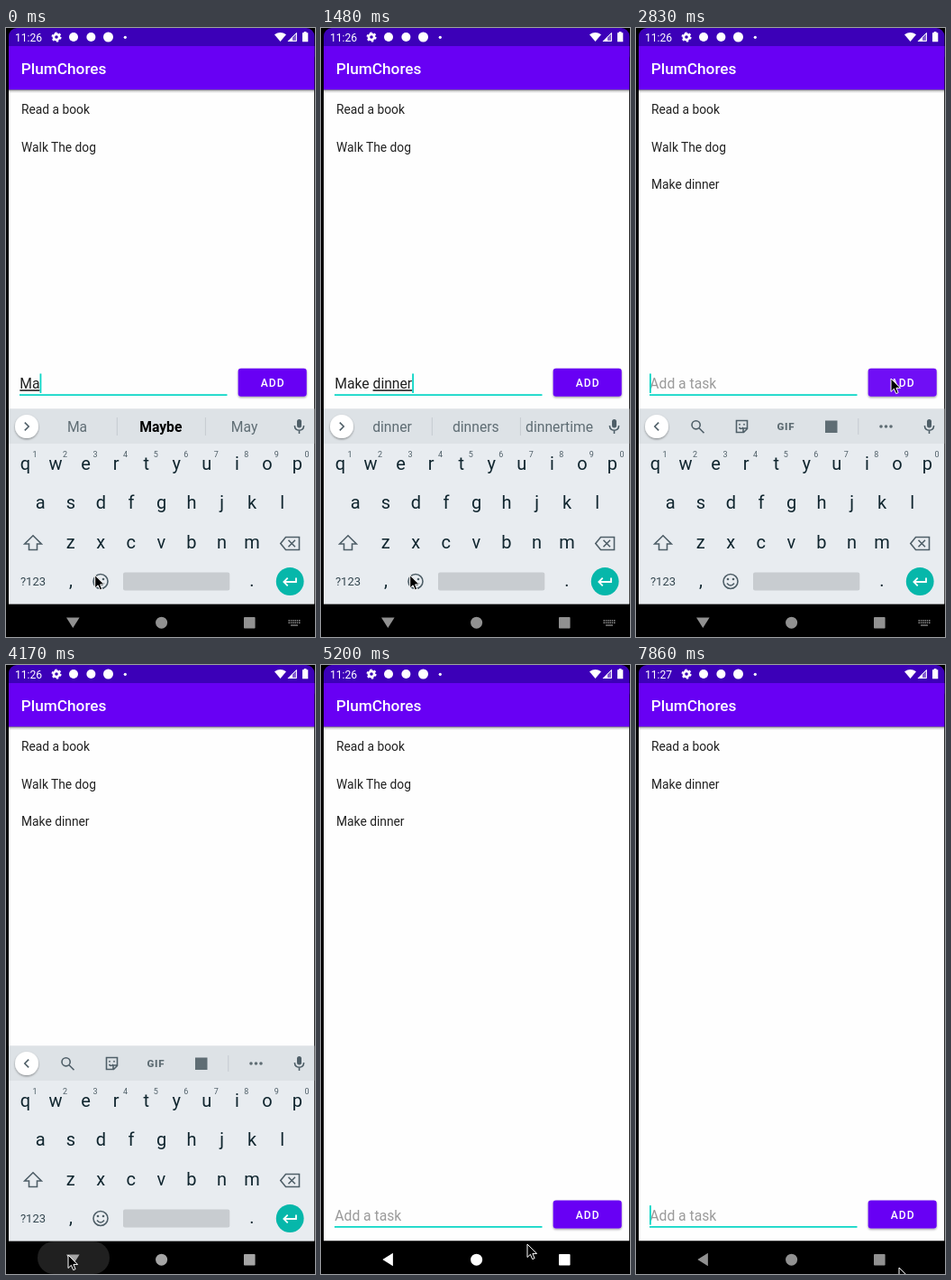
An HTML page for the animation above (8 s loop, 343 by 674 pixels).

```html
<!DOCTYPE html>
<html lang="en">
<head>
<meta charset="utf-8">
<title>Task list</title>
<style>
  html, body { margin: 0; width: 100%; height: 100%; overflow: hidden; background: #000; }
  svg { display: block; width: 343px; height: 674px; font-family: Roboto, sans-serif; }
  text { white-space: pre; }
  .mid { text-anchor: middle; }
  .line { fill: none; stroke: #4f5f68; stroke-width: 1.6; }
  .item { font-size: 13.8px; fill: #212121; }
  .field { font-size: 15.7px; }
  .hint { fill: #9a9a9a; }
  .typing { text-decoration: underline; }
  .button { font-size: 12.1px; font-weight: 500; letter-spacing: 1.08px; fill: #fff; }
  .key { font-size: 20px; fill: #10262f; }
  .digit { font-size: 9px; fill: #4f5f68; }
  .pick { font-size: 15.7px; fill: #5f6d74; }
  .best { font-weight: 700; fill: #000; }
</style>
</head>
<body>
<svg viewBox="0 0 343 674">
  <defs>
    <clipPath id="page"><path d="M3 68H342.4V637.5H3z"/></clipPath>
    <linearGradient id="shade" x2="0" y2="1">
      <stop stop-color="#000" stop-opacity=".3"/><stop offset="1" stop-color="#000" stop-opacity="0"/>
    </linearGradient>
    <filter id="lift" x="-10%" y="-20%" width="120%" height="150%">
      <feDropShadow dx="0" dy="1.2" stdDeviation="1" flood-opacity=".4"/>
    </filter>
  </defs>
  <rect width="343" height="674"/>

  <!-- status and title bars -->
  <rect x="3" width="339.4" height="40" rx="9" fill="#3c00b8"/>
  <g fill="#fff">
    <text id="clock" x="10" y="14.6" font-size="12.1"></text>
    <circle cx="56" cy="10" r="3.1" fill="none" stroke="#fff" stroke-width="2.6"/>
    <circle cx="56" cy="10" r="4.7" fill="none" stroke="#fff" stroke-width="1.7" stroke-dasharray="2.4 2.52"/>
    <circle cx="75" cy="10" r="5"/>
    <circle cx="94.4" cy="10" r="5"/>
    <circle cx="113.5" cy="10" r="5.5"/>
    <circle cx="132.3" cy="10.3" r="1.6"/>
    <path d="M298 7.3Q304.5 2.5 311 7.3L304.5 15z"/>
    <path d="M323 4.5V15H312.5z" fill-opacity=".35"/>
    <path d="M322.4 5.6V14.4H313.6z" fill="none" stroke="#fff"/>
    <path d="M318 9.5V15H312.5z"/>
    <path d="M329 5.3H330.7V4H333.5V5.3H335.3V15.2H329z"/>
  </g>
  <path d="M3 20H342.4V68.5H3z" fill="#6800f4"/>
  <text x="16.7" y="51.3" font-size="17.26" font-weight="500" fill="#fff">PlumChores</text>

  <g clip-path="url(#page)">
    <path d="M3 68.5H342.4V637.5H3z" fill="#fefefe"/>
    <path d="M3 68.5H342.4V72H3z" fill="url(#shade)"/>
    <text class="item" x="17" y="95">Read a book</text>
    <text class="item" x="17" y="136.5" id="second">Walk The dog</text>
    <text class="item" x="17" id="third">Make dinner</text>

    <g id="entry">
      <text class="field" x="15.3" y="399.3" id="input" fill="#212121"><tspan id="done"></tspan><tspan id="typing" class="typing"></tspan></text>
      <text class="field hint" x="15.3" y="399.3" id="hint">Add a task</text>
      <path d="M15 406.2H245.5" stroke="#0bd6c6" stroke-width="1.8"/>
      <rect id="caret" y="382.5" width="1.8" height="21.5" fill="#0bd6c6"/>
      <rect x="257.7" y="376.8" width="76" height="31" rx="3.2" fill="#6800f4" filter="url(#lift)"/>
      <rect id="ripple" x="257.7" y="376.8" width="76" height="31" rx="3.2" fill="#fff"/>
      <text class="button" x="282.7" y="397.3">ADD</text>
    </g>

    <g id="keyboard">
      <path d="M3 421.5H342.4V638H3z" fill="#e8ecf0"/>
      <path d="M3 421.5H342.4V460H3z" fill="#dde2e6"/>
      <circle cx="23" cy="441" r="13" fill="#fff" filter="url(#lift)"/>
      <path id="chevron" class="line" d="M-2.2 -4.4L2.2 0L-2.2 4.4"/>
      <g fill="#4f5f68">
        <rect x="323" y="433" width="5" height="9.6" rx="2.5"/>
        <path class="line" stroke-width="1.4" d="M320.4 440Q320.6 445.2 325.5 445.2T330.6 440M325.5 445V449"/>
      </g>
      <g id="picks"><path d="M123.3 431V451M221.4 431V451" stroke="#c5cbd0"/></g>
      <g id="tools" fill="#5f6d74">
        <circle class="line" cx="66.6" cy="439.3" r="4.6"/>
        <path class="line" d="M70 442.7L75.5 448.2"/>
        <path class="line" d="M111.5 434.5H123.5V443.5L119.5 447.5H111.5zM123.5 443H119V447.5M114.5 442Q116.5 445 119 442"/>
        <circle cx="115" cy="438.7" r="1"/><circle cx="120" cy="438.7" r="1"/>
        <text class="mid" x="166.4" y="445" font-size="11.5" font-weight="900" letter-spacing=".7">GIF</text>
        <rect x="210" y="434.5" width="13.5" height="13.5"/>
        <path d="M246.8 432V450" stroke="#c5cbd0"/>
        <circle cx="272" cy="441" r="1.8"/><circle cx="277.5" cy="441" r="1.8"/><circle cx="283" cy="441" r="1.8"/>
      </g>
      <g id="keys"></g>
      <path class="line" d="M30 561.8L39.3 571H34.5V577.5H25.5V571H20.7z"/>
      <path class="line" d="M310.5 563.5H325.5V577.5H310.5L304.8 570.5zM313.5 566.8L321 574.3M321 566.8L313.5 574.3"/>
      <text class="mid" x="30" y="617.3" font-size="13" fill="#33464f">?123</text>
      <circle class="line" cx="105" cy="612.5" r="8"/>
      <path class="line" d="M101 614.5Q105 619.5 109 614.5"/>
      <circle cx="102" cy="610" r="1.3" fill="#4f5f68"/><circle cx="108" cy="610" r="1.3" fill="#4f5f68"/>
      <rect x="130" y="602.5" width="118.3" height="20" rx="2" fill="#c8ccd0"/>
      <circle cx="315.2" cy="612.5" r="15.4" fill="#06b7aa"/>
      <path d="M322 608.5V613H308.5M312.7 608.7L308.4 613L312.7 617.3" fill="none" stroke="#fff" stroke-width="1.8"/>
    </g>
  </g>

  <!-- navigation bar -->
  <rect id="pill" x="35" y="638" width="80" height="36" rx="18" fill="#202020"/>
  <g id="nav">
    <path id="back" d="M-7.3 -5.6H7.3L0 6z"/>
    <circle cx="172.6" cy="658.2" r="6.5"/>
    <rect x="264" y="652" width="12.6" height="12.6" rx=".8"/>
  </g>
  <path id="switcher" d="M313.5 655.7H326.5M313.5 658.2H326.5" stroke="#8c8c8c" stroke-width="1.5" stroke-dasharray="1.5 .8"/>
  <path id="switcherBase" d="M316 661H324" stroke="#8c8c8c" stroke-width="1.3"/>
  <path id="cursor" d="M0 0V14.5L3.4 11.3L5.7 16.6L8.1 15.6L5.9 10.4H10.6z" stroke="#fff" stroke-width="1"/>
</svg>

<script>
const LOOP = 8000, STEP = LOOP / 54;
const $ = id => document.getElementById(id);
const set = (id, attrs) => { for (const k in attrs) $(id).setAttribute(k, attrs[k]); };
const show = (id, on) => set(id, { visibility: on ? 'visible' : 'hidden' });
const ramp = (t, a, b) => Math.max(0, Math.min(1, (t - a) / (b - a)));
const ease = u => u * u * (3 - 2 * u);

function label(parent, cls, x, y, str = '') {
  const el = document.createElementNS('http://www.w3.org/2000/svg', 'text');
  el.setAttribute('class', 'mid ' + cls);
  el.setAttribute('x', x);
  el.setAttribute('y', y);
  el.textContent = str;
  return $(parent).appendChild(el);
}

const PITCH = 33.55;
[['qwertyuiop', 21.5, 489], ['asdfghjkl', 38.3, 532], ['zxcvbnm', 71.7, 576]].forEach(([row, x, y]) =>
  [...row].forEach((c, i) => label('keys', 'key', x + i * PITCH, y, c)));
[...'1234567890'].forEach((c, i) => label('keys', 'digit', 32 + i * PITCH, 475, c));
label('keys', 'key', 72, 618, ',');
label('keys', 'key', 273, 618, '.');
const picks = [79, 171.8, 264.6].map(x => label('picks', 'pick', x, 447));

// start, finished text, word being typed, suggestions, bold middle
const typed = [
  [0, '', 'Ma', 'Ma Maybe May', true],
  [140, '', 'Make', 'Make Makes Mark', false],
  [280, 'Make ', '', 'sure it a', false],
  [880, 'Make ', 'd', 'd dinner do', true],
  [1180, 'Make ', 'di', 'di dinner did', true],
  [1325, 'Make ', 'dinn', 'dinn dinner dine', true],
  [1470, 'Make ', 'dinner', 'dinner dinners dinnertime', false],
  [2650, '', '', 'dinner dinners dinnertime', false]
];
// time, x, y of the pointer tip
const path = [
  [0, 98.7, 605.5], [1630, 98.7, 605.5], [2510, 283, 388], [2970, 283, 388],
  [3700, 69, 653], [4500, 69, 653], [5180, 229, 641], [5240, 229, 641],
  [6220, 85.3, 131.5], [7270, 85.3, 131.5], [7850, 292, 667], [LOOP, 292, 667]
];
const ADDED = 2650, HIDE = 4140;

function pointer(t) {
  const i = path.findIndex(p => p[0] > t);
  const [t0, x0, y0] = path[i - 1], [t1, x1, y1] = path[i];
  const u = ease(ramp(t, t0, t1));
  return `translate(${x0 + (x1 - x0) * u} ${y0 + (y1 - y0) * u})`;
}

function draw(t) {
  const [start, done, word, words, bold] = typed.findLast(s => s[0] <= t);
  $('done').textContent = done;
  $('typing').textContent = word;
  words.split(' ').forEach((w, i) => picks[i].textContent = w);
  picks[1].classList.toggle('best', bold);

  const tools = t > 2800, hidden = t >= HIDE;
  show('hint', tools);
  show('tools', tools);
  show('picks', !tools);
  set('chevron', { transform: `translate(23 441) scale(${tools ? -1 : 1} 1)` });

  const blink = hidden ? t + 500 : t - start;
  show('caret', blink % 1000 < 500);
  const end = done || word ? $('input').getComputedTextLength() + .3 : 0;
  set('caret', { x: 15 + end });
  set('entry', { transform: `translate(0 ${hidden ? 215.6 : 0})` });
  set('ripple', { opacity: t < 2600 ? 0 : .2 * (1 - ramp(t, 2600, 2900)) });

  set('third', {
    opacity: ramp(t, ADDED - 50, ADDED + 70),
    y: 178 - 41.5 * ease(ramp(t, 6780, 7030))
  });
  set('second', { opacity: 1 - ramp(t, 6640, 6800) });
  $('clock').textContent = t < 6800 ? '11:26' : '11:27';

  const slide = ramp(t, 4160, 4420);
  set('keyboard', { transform: `translate(0 ${217 * ease(slide)})` });
  const grey = 145 + 110 * (ramp(t, 4050, 4600) - ramp(t, 6640, 7100));
  set('nav', { fill: `rgb(${grey},${grey},${grey})` });
  set('back', { transform: `translate(74.3 658) rotate(${90 * slide})` });
  set('pill', { opacity: hidden ? 1 - ramp(t, 4300, 4600) : 0 });
  show('switcher', !hidden);
  show('switcherBase', !hidden);
  set('cursor', { transform: pointer(t) });
}

const begin = performance.now();
function tick() {
  const t = (performance.now() - begin) % LOOP;
  draw(Math.min(53, Math.floor((t + 10) / STEP)) * STEP);
  requestAnimationFrame(tick);
}
tick();
</script>
</body>
</html>
```
